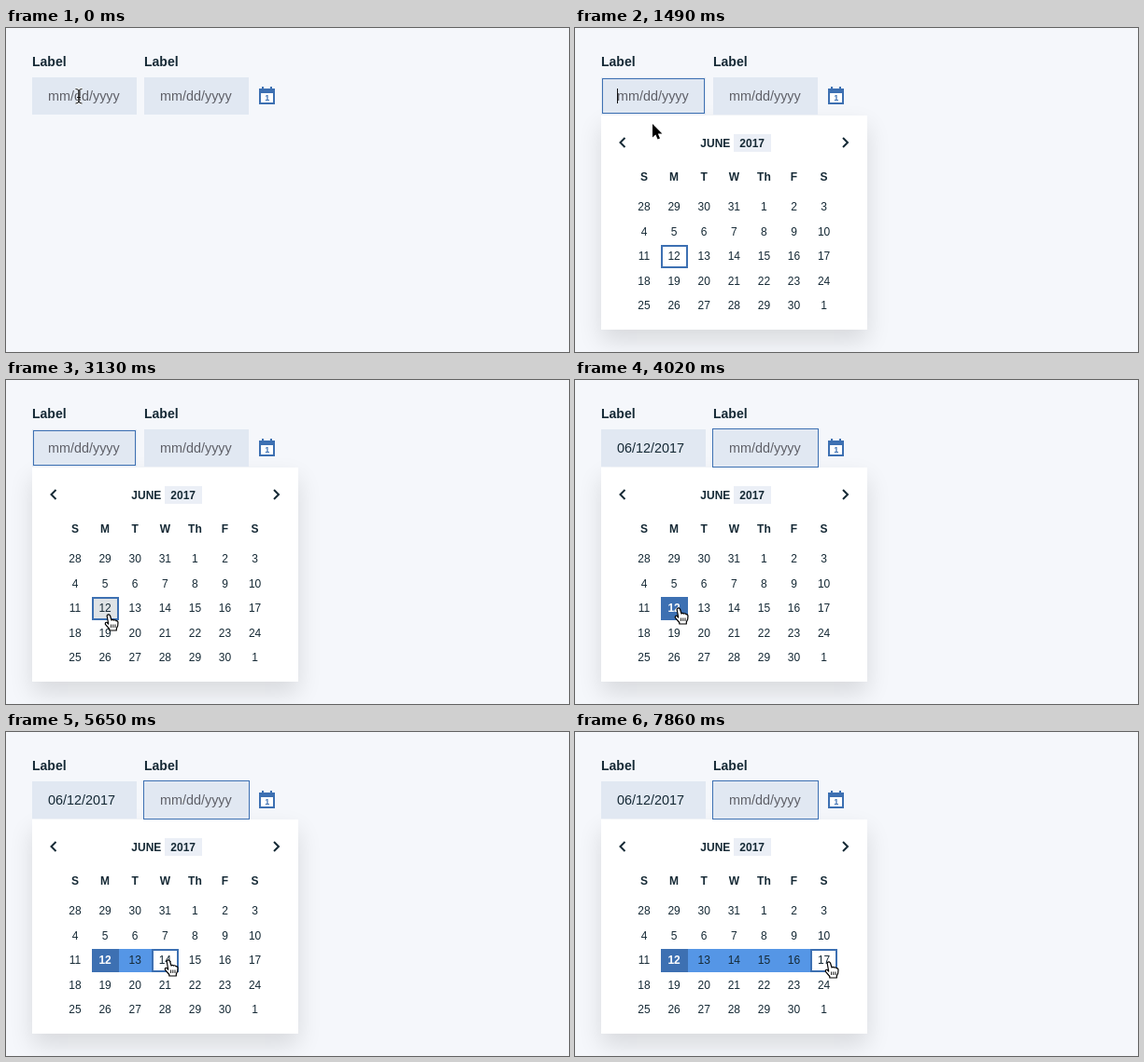
Recreate the animation shown at these times as an HTML page with a canvas. Size 603x348 px, loop 8 s.

```html
<!DOCTYPE html>
<html lang="en">
<head>
<meta charset="utf-8">
<title>Date range picker</title>
<style>
  html, body { margin: 0; width: 100%; height: 100%; overflow: hidden; background: #f5f7fb; }
  canvas { display: block; }
</style>
</head>
<body>
<canvas id="stage" width="603" height="348"></canvas>
<script>
const ctx = document.getElementById('stage').getContext('2d');
const LOOP = 8000, TICK = 148.3;
const BLUE = '#3d70b2', INK = '#152935', FIELD = '#e1e8f2';
const TODAY = 15, OPEN = 1, PICK = 27;

// pointer path: tick, x, y
const path = [
  [8, 78, 73], [9, 79, 84], [11, 87, 122], [12, 89, 132], [13, 89, 132],
  [14, 89, 142], [16, 96, 205], [17, 98, 228], [18, 102, 240], [20, 110, 252],
  [22, 110, 252], [25, 111, 245], [33, 111, 245], [34, 115, 246], [35, 126, 246],
  [37, 162, 246], [38, 174, 245], [41, 188, 247], [45, 222, 248], [47, 232, 248],
  [49, 241, 248], [51, 257, 247], [53, 272, 247]
];

const shapes = {
  hand: new Path2D('M-1.9 1Q-.2-1.3 1.5 1L3 6Q4.4 4.6 5.6 6.1Q7 5.1 8 6.8Q9.8 6.3 10 8.5L9.7 12L8.3 15V17H.8V15.5L-3.6 10.3Q-4 8 -2 8.3L-.3 10Z'),
  creases: new Path2D('M2.6 10.5V14M4.8 10.5V14M7 10.5V14'),
  arrow: new Path2D('M0 0V14.5L3.4 11.4L5.6 16.5L8 15.4L5.8 10.5H10.4Z'),
  beam: new Path2D('M-3.5-7.5Q0-7.5 0-5V5.5Q0 8 -3.5 8M3.5-7.5Q0-7.5 0-5V5.5Q0 8 3.5 8M-2 1.5H2')
};

function fill(x, y, w, h, color) {
  ctx.fillStyle = color;
  ctx.fillRect(x, y, w, h);
}

function frame(x, y, w, h, width, color = BLUE) {
  ctx.strokeStyle = color;
  ctx.lineWidth = width;
  ctx.strokeRect(x + width / 2, y + width / 2, w - width, h - width);
}

function text(str, x, y, size, color = INK, bold = false, align = 'center') {
  ctx.font = `${bold ? 'bold ' : ''}${size}px "Liberation Sans", Arial, sans-serif`;
  ctx.textAlign = align;
  ctx.fillStyle = color;
  ctx.fillText(str, x, y);
}

function stroke(shape, color, width) {
  ctx.strokeStyle = color;
  ctx.lineWidth = width;
  ctx.stroke(shape);
}

function pointerAt(tick) {
  const i = path.findIndex(p => p[0] >= tick);
  if (i < 0) return path[path.length - 1].slice(1);
  if (i === 0) return path[0].slice(1);
  const [t0, x0, y0] = path[i - 1], [t1, x1, y1] = path[i];
  const f = (tick - t0) / (t1 - t0);
  return [Math.round(x0 + (x1 - x0) * f), Math.round(y0 + (y1 - y0) * f)];
}

function drawFields(tick) {
  const picked = tick >= PICK;
  [28, 148].forEach(x => {
    text('Label', x, 41, 14, INK, true, 'left');
    fill(x, 53, 112, 40, FIELD);
  });
  text(picked ? '06/12/2017' : 'mm/dd/yyyy', 45, 78, 14.4, picked ? INK : '#5f6068', false, 'left');
  text('mm/dd/yyyy', 165, 78, 14.4, '#5f6068', false, 'left');
  if (picked) frame(147, 52, 114, 42, 1);
  else if (tick >= OPEN) {
    frame(29, 54, 110, 38, 1);
    if ((tick + 2.25) % 7.1 >= 3) fill(45, 65, 1, 16, '#111');
  }
}

function drawIcon() {
  fill(271, 65, 17, 17, BLUE);
  fill(273, 70, 13, 10, '#fff');
  fill(274, 63, 2, 3, BLUE);
  fill(283, 63, 2, 3, BLUE);
  text('1', 279.7, 78.2, 9, BLUE, true);
}

function drawCalendar(tick, px, py) {
  const left = Math.max(0, 1 - ((tick - OPEN) * TICK + 6) / 300) ** 5;
  ctx.save();
  ctx.globalAlpha = 1 - left;
  ctx.translate(0, -20 * left);

  ctx.save();
  ctx.shadowColor = 'rgba(0,0,0,.12)';
  ctx.shadowBlur = 24;
  ctx.shadowOffsetY = 12;
  fill(28, 94, 285, 230, '#fff');
  ctx.restore();

  fill(170, 114, 40, 19, '#ebeff6');
  text('JUNE', 150.3, 128, 12, INK, true);
  text('2017', 189.7, 128, 12, INK, true);
  stroke(new Path2D('M53.5 118L48.5 123L53.5 128M287 118L292 123L287 128'), INK, 2);

  const centre = col => 74 + 32.1 * col;
  ['S', 'M', 'T', 'W', 'Th', 'F', 'S'].forEach((day, col) => text(day, centre(col), 164, 12, INK, true));

  const row = Math.floor((py - 179) / 26.5), col = Math.floor((px - 57.9) / 32.1);
  const hover = row >= 0 ? row * 7 + col : -1;
  const picked = tick >= PICK;
  const cellX = i => Math.round(centre(i % 7) - 14.2);
  const cellY = i => Math.round(180 + 26.5 * Math.floor(i / 7));

  if (picked) {
    const x = cellX(TODAY), y = cellY(TODAY), end = cellX(hover);
    if (hover > TODAY) {
      fill(x, y, end - x, 25, '#5596e6');
      frame(end, y, 29, 25, 2);
    }
    fill(x, y, 29, 25, BLUE);
  } else {
    if (hover >= 0) fill(cellX(hover), cellY(hover), 29, 25, '#dfe3e6');
    frame(cellX(TODAY), cellY(TODAY), 29, 25, 2);
  }

  for (let i = 0; i < 35; i++) {
    const date = i < 4 ? 28 + i : (i - 4) % 30 + 1;
    const chosen = picked && i === TODAY;
    text(date, centre(i % 7), 196 + 26.5 * Math.floor(i / 7), 12, chosen ? '#fff' : INK, chosen);
  }
  ctx.restore();
}

function drawPointer(x, y) {
  ctx.save();
  ctx.translate(x, y);
  ctx.lineJoin = 'round';
  if (y < 93) {
    stroke(shapes.beam, 'rgba(255,255,255,.7)', 2.5);
    stroke(shapes.beam, '#111', 1);
  } else if (y < 179) {
    stroke(shapes.arrow, '#fff', 2);
    ctx.fillStyle = '#000';
    ctx.fill(shapes.arrow);
  } else {
    ctx.fillStyle = '#fff';
    ctx.fill(shapes.hand);
    stroke(shapes.hand, '#000', 1.2);
    stroke(shapes.creases, '#000', .9);
  }
  ctx.restore();
}

function draw(now) {
  const tick = Math.floor((now % LOOP + 9) / TICK);
  const [x, y] = pointerAt(tick);
  fill(0, 0, 603, 348, '#f5f7fb');
  if (tick >= OPEN) drawCalendar(tick, x, y);
  drawFields(tick);
  drawIcon();
  drawPointer(x, y);
  requestAnimationFrame(draw);
}
requestAnimationFrame(draw);
</script>
</body>
</html>
```
